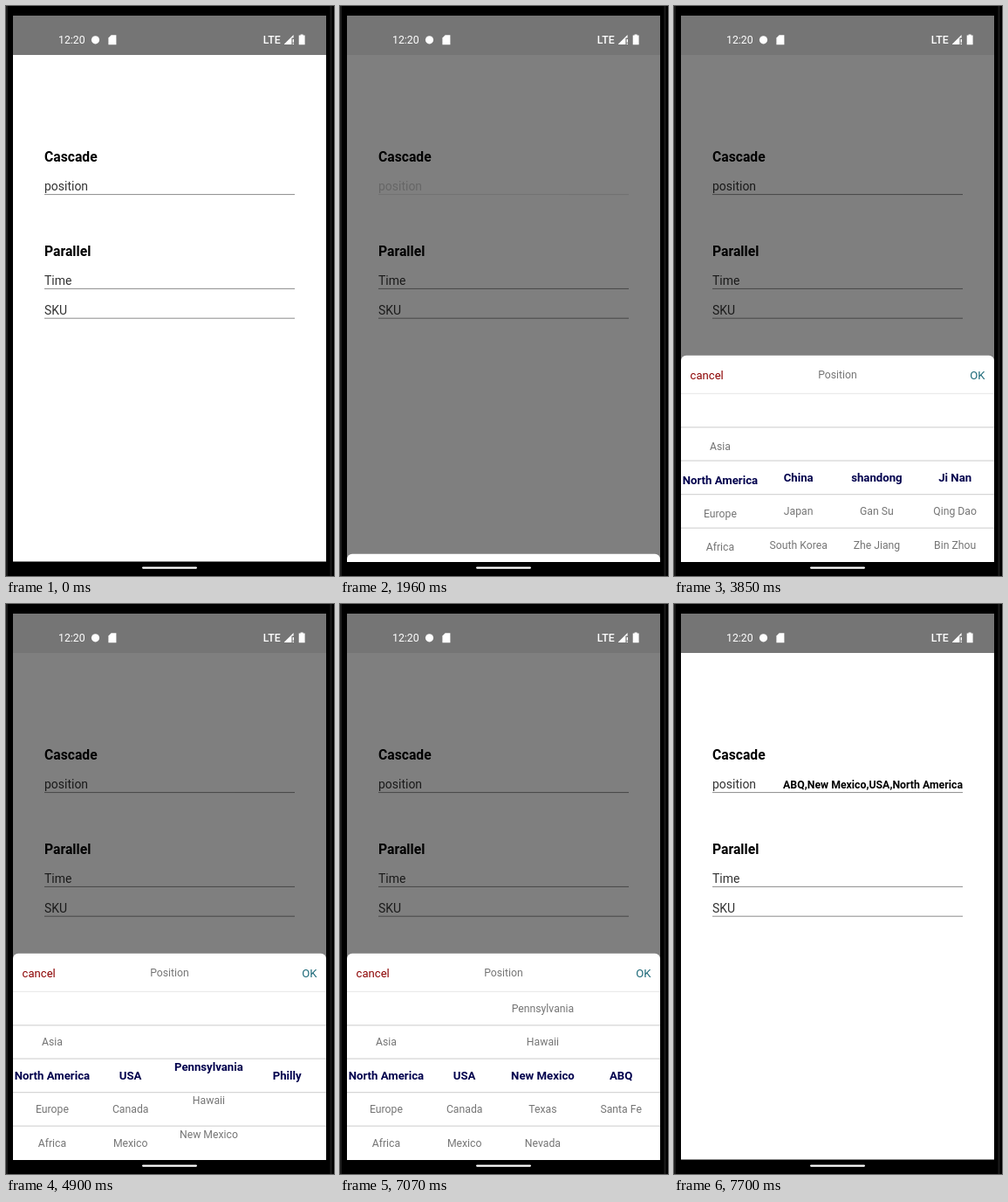
An HTML page for the animation above (8 s loop, 376 by 652 pixels).

```html
<!DOCTYPE html>
<html lang="en">
<head>
<meta charset="utf-8">
<title>Cascade picker</title>
<style>
  html, body { margin: 0; width: 100%; height: 100%; overflow: hidden; background: #000; }
  svg { display: block; width: 376px; height: 652px; font-family: Roboto, sans-serif; }
  .heading { font-size: 15.7px; font-weight: 700; fill: #000; }
  .label { font-size: 13.97px; fill: #333; }
  .rule { stroke: #8c8c8c; }
  .value { font-size: 12.3px; font-weight: 700; text-anchor: end; }
  .status { font-size: 12.3px; fill: #fff; }
  .action { font-size: 13.1px; }
  .item { font-size: 12.22px; fill: #757575; text-anchor: middle; }
  .item.selected { font-size: 13.2px; font-weight: 700; fill: #00004d; }
</style>
</head>
<body>
<svg viewBox="0 0 376 652">
  <defs>
    <clipPath id="screen"><rect x="8" y="11" width="359" height="624.5"/></clipPath>
    <clipPath id="list"><rect x="8" y="443.5" width="359" height="192"/></clipPath>
  </defs>

  <rect width="376" height="652"/>
  <path d="M1 0V652M372.5 0V652" stroke="#1c1c1c" stroke-width="2"/>

  <g clip-path="url(#screen)">
    <rect x="8" y="11" width="359" height="625" fill="#fff"/>
    <text class="heading" x="44" y="178">Cascade</text>
    <g id="position">
      <text class="label" x="44" y="211.3">position</text>
      <path class="rule" d="M44 215.6H331"/>
    </g>
    <text id="value" class="value" x="331" y="211">ABQ,New Mexico,USA,North America</text>
    <text class="heading" x="44" y="285.6">Parallel</text>
    <text class="label" x="44" y="319">Time</text>
    <path class="rule" d="M44 323.4H331"/>
    <text class="label" x="44" y="353">SKU</text>
    <path class="rule" d="M44 357.2H331"/>

    <rect id="dim" x="8" y="56" width="359" height="580" fill-opacity=".5"/>

    <g id="sheet">
      <rect x="8" y="399.7" width="359" height="260" rx="6" fill="#fff"/>
      <text class="action" x="18.6" y="426.8" fill="#8b0000">cancel</text>
      <text class="item" x="187.5" y="426.2">Position</text>
      <text class="action" id="ok" x="356.6" y="426.8" fill="#1f6b7a" text-anchor="end">OK</text>
      <path d="M8 443.3H367" stroke="#e6e6e6"/>
      <path d="M8 481.9H367M8 520.2H367M8 558.6H367M8 597.1H367" stroke="#d6d6d6" stroke-width="1.3"/>
      <g id="columns" clip-path="url(#list)"></g>
    </g>
  </g>

  <g fill="#fff">
    <rect x="8" y="11" width="359" height="45" fill="#757575"/>
    <text class="status" x="60" y="43.2">12:20</text>
    <circle cx="102.5" cy="38.8" r="4.6"/>
    <path d="M120.6 33.3H126.4V44.2H117.4V36.5Z"/>
    <text class="status" x="294.8" y="43.2" font-weight="500">LTE</text>
    <path d="M319 44V43.6L329.6 33V36.5H327.4V44Z"/>
    <path d="M328.6 38H330V41.8H328.6ZM328.6 42.7H330V44H328.6Z"/>
    <path d="M337.6 33.6V32.4H340.6V33.6H342.6V44.2H335.7V33.6Z"/>
    <rect x="156" y="641.5" width="63" height="2.2" rx="1.1"/>
  </g>
</svg>

<script>
const LOOP = 8000, TICK = 70, ROW = 38.4, SHEET = 236;
const byId = id => document.getElementById(id);
const px = y => `translateY(${y.toFixed(2)}px)`;
const easeInOut = p => p < .5 ? 2 * p * p : 1 - 2 * (1 - p) ** 2;

// Holds each value until the next [ms, value] stop.
function track(el, prop, stops) {
  const frames = [...stops, [LOOP, stops.at(-1)[1]]].map(([ms, value]) =>
    ({ offset: ms / LOOP, [prop]: value, easing: 'step-end' }));
  el.animate(frames, { duration: LOOP, iterations: Infinity });
}

function show(el, from, to = LOOP) {
  const stops = [[from, 'visible']];
  if (from > 0) stops.unshift([0, 'hidden']);
  if (to < LOOP) stops.push([to, 'hidden']);
  track(el, 'visibility', stops);
}

// Eased movement sampled once per tick; begin may precede the first tick.
function glide(begin, first, last, a, b) {
  const stops = [];
  for (let t = first; t <= last; t += TICK) {
    stops.push([t, px(a + (b - a) * easeInOut((t - begin) / (last - begin)))]);
  }
  return stops;
}

function svg(tag, parent, attrs = {}) {
  const el = document.createElementNS('http://www.w3.org/2000/svg', tag);
  for (const name in attrs) el.setAttribute(name, attrs[name]);
  return parent.appendChild(el);
}

function column(index) {
  return svg('g', byId('columns'), { transform: `translate(${52.9 + index * 89.75} 0)` })
    .appendChild(document.createElementNS('http://www.w3.org/2000/svg', 'g'));
}

function options(parent, names, selected, from, to) {
  const group = svg('g', parent);
  names.split(',').forEach((name, i) => {
    const bold = i === selected;
    const text = svg('text', group, {
      class: bold ? 'item selected' : 'item',
      y: 539.5 + i * ROW + (bold ? 4.8 : 4.4)
    });
    text.textContent = name;
  });
  show(group, from, to);
}

const [continent, country, state, city] = [0, 1, 2, 3].map(column);
const continents = 'Asia,North America,Europe,Africa';
const states = 'Pennsylvania,Hawaii,New Mexico,Texas,Nevada';

options(continent, continents, 0, 0, 3780);
options(continent, continents, 1, 3780);
options(country, 'China,Japan,South Korea', 0, 0, 4130);
options(country, 'USA,Canada,Mexico', 0, 4130);
options(state, 'shandong,Gan Su,Zhe Jiang', 0, 0, 4130);
options(state, states, 0, 4130, 5740);
options(state, states, 2, 5740);
options(city, 'Ji Nan,Qing Dao,Bin Zhou', 0, 0, 4130);
options(city, 'Philly', 0, 4130, 6160);
options(city, 'ABQ,Santa Fe', 0, 6160);

track(continent, 'transform', [
  [0, px(0)],
  ...glide(2800, 2870, 3780, 0, -36),
  [3850, px(-36)], [3920, px(-37.6)], [3990, px(-ROW)]
]);
track(state, 'transform', [
  [0, px(0)],
  ...glide(4690, 4760, 5530, 0, -79.4),
  ...glide(5670, 5740, 6020, -79.4, -2 * ROW)
]);

track(byId('sheet'), 'transform', [
  [0, px(SHEET)],
  ...glide(1904, 1960, 2310, SHEET, 0),
  ...glide(7240, 7280, 7700, 0, SHEET)
]);
show(byId('sheet'), 1960, 7700);
show(byId('dim'), 1960, 7700);
show(byId('value'), 7700);
track(byId('position'), 'opacity',
  [[0, 1], [1470, .25], [2030, .3], [2100, .55], [2170, .85], [2240, 1]]);
</script>
</body>
</html>
```
